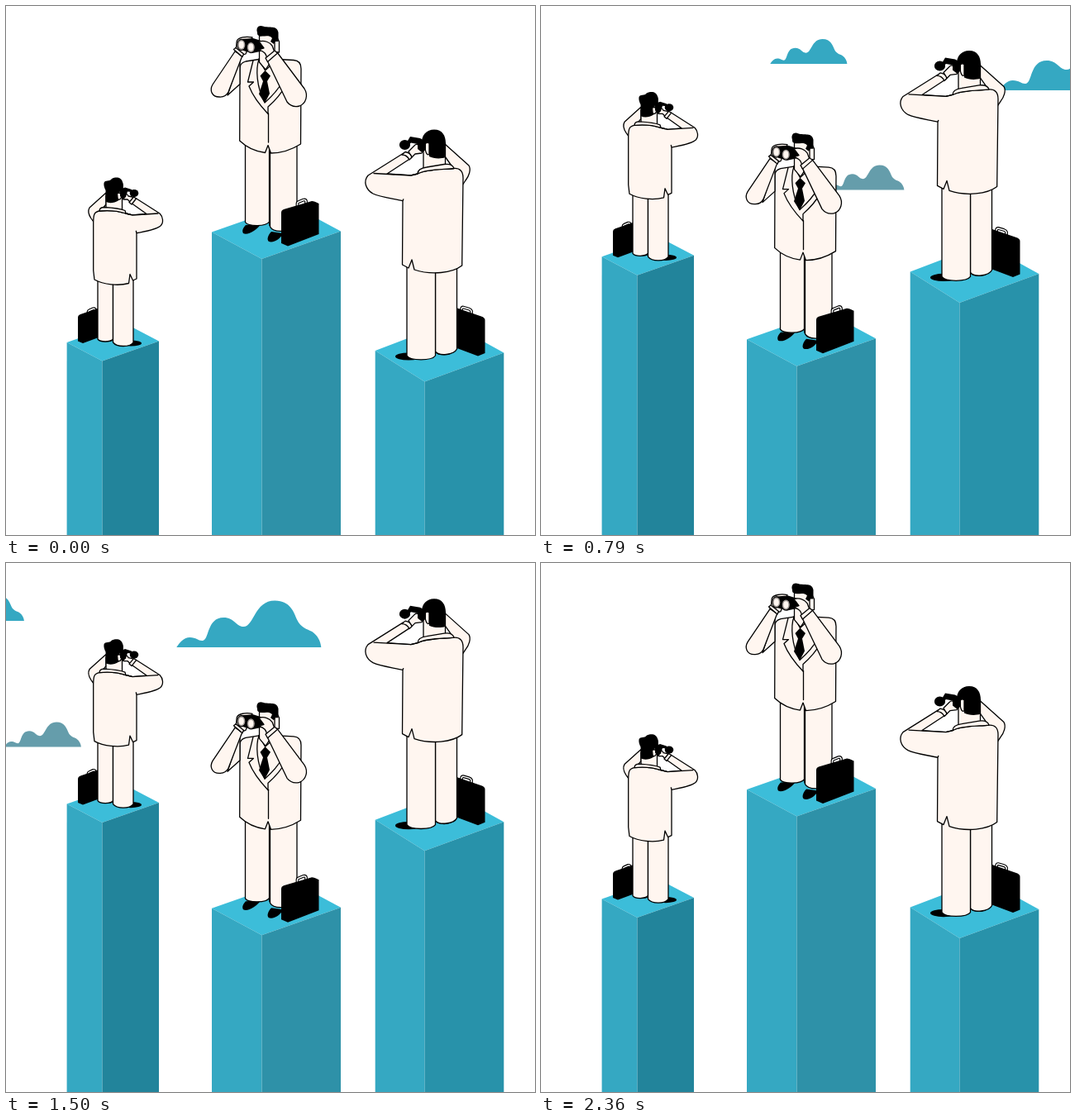
These frames come from a looping animation (640x640 px, 2.43 s). An HTML page with a canvas:

```html
<!DOCTYPE html>
<html lang="en">
<head>
<meta charset="utf-8">
<title>Lookouts</title>
<style>
html, body { margin: 0; width: 100%; height: 100%; overflow: hidden; background: #fff; }
canvas { display: block; width: 640px; height: 640px; }
</style>
</head>
<body>
<canvas id="stage" width="640" height="640"></canvas>
<script>
const ctx = document.getElementById('stage').getContext('2d');
const LOOP = 2430, STEPS = 34, TICKS = 60;
const CREAM = '#fff6f0', BLUE = '#35a8c2', TOP = '#3cbdd9', GREY = '#659dab', RING = '#a39d9a';

const layer = (d, fill, width, stroke = '#000') => ({ path: new Path2D(d), fill, width, stroke });
const skin = d => layer(d, CREAM, 1.3);
const ink = d => layer(d, '#000', 0);
const line = (d, w = 1.3) => layer(d, null, w);
const handle = d => [layer(d, null, 3.8), layer(d, null, 1.5, '#fff')];
const oval = (x, y, rx, ry, fill, width = 0) =>
  layer(`M${x - rx} ${y}a${rx} ${ry} 0 1 0 ${2 * rx} 0a${rx} ${ry} 0 1 0 ${-2 * rx} 0Z`, fill, width);
const lens = (x, y) => [oval(x, y, 5.6, 7.2, '#000'), oval(x, y, 4.5, 6, RING), oval(x, y, 3, 4.4, CREAM)];

// Front-facing man
const front = [
  ink('M290 265C287 268 285 272 287 275C292 278 304 271 308 264Z'),
  ink('M321 273C317 277 315 283 318 285C324 287 333 281 335 275Z'),
  skin('M289.5 160V261.5C293 267 315 267 318.5 261V160Z'),
  skin('M319.5 160V267C322 272 330 273 338 272L352 266V160Z'),
  line('M319 170V265', 2),
  ...handle('M352.500 244V239Q352.500 237.500 354 237L360 234.500Q362.500 234 363 236V241'),
  ink('M333 250Q333 247 336 246L370 236Q373 236 378.500 239V276L341 290.500L333 287Z'),
  skin('M283 75Q283 69 290 67L306 64.500H330L348 65.500Q357 66 357 76L356.500 167C347 173 336 178 320.500 178L317 168.500L313.500 177.500C302 176 291 171 282.700 163Z'),
  skin('M306 64.500C302 76 303 98 313 117C322 109 330 100 334 92L327 65Z'),
  line('M299 66L292.500 92H299.500L294 97C299 110 308 121 317 130.500V122C326 114 333 106 337 98'),
  line('M317.500 130V165'),
  skin('M306 64L313.500 78L329 64Z'),
  ink('M313.500 78L320 84.500L316 91L319 106L313 117.500L306 106.500L311 91L307.500 84.500Z'),
  skin('M284 60L268 108L283 94.500V64Z'),
  skin('M277 55L250 95C246 102 249 110 258 110C264 110.500 267 108 269 104L286 60Z'),
  skin('M306.500 36V68L314 77L320 68L325 56H330.500V43L325 32Z'),
  line('M325 44V56'),
  ink('M304 32C302 26 306 22.500 311 24.500C319 27 328 23 329.500 32V43H326L324 46L320 43L322 39C318 34 311 38 306 36C304 35 304 34 304 32Z'),
  skin('M277 54C280 50 278 46 279.500 42C281 38 290 36.500 298 38L290 58L284 60Z'),
  skin('M275.500 52.500L278 50.500L287.500 58L286 61.500Z'),
  ink('M284 40L299 39L312 43V54L298 57L287 54Z'),
  ...lens(284.800, 47),
  ...lens(296.300, 50),
  line('M290 41L298 42M300 45L310 46', .8),
  skin('M306 43C313 41 319 44 322 48L325 56L316 65C315 57 312 55 306 53L312 51Z'),
  skin('M316 66L328 56L361 100C366 108 363 118 355 121C349 122.500 344 121 340 116Z'),
  skin('M314 63L325 54L328.500 57L316.500 67.500Z')
];

// Man seen from behind, arms to the right
const backLeft = [
  ...handle('M99.500 375V370Q99.500 369 101 368.300L105.500 366.300Q107.500 366 108 368V371'),
  ink('M87 377Q87 374 90 373L112 365.500V401L93 408L87 405.500Z'),
  oval(124, 403, 7, 3, '#000'),
  oval(151, 408, 13, 3.6, '#000'),
  skin('M111 322V403C114 407 126 407 129.500 403V325Z'),
  skin('M129.500 325V407C134 413 150 413 154 407V322Z'),
  skin('M121 226L101 244C98 249 101 254 103 257L106.500 262L116 246L121 240Z'),
  skin('M121 230V249H140.500V227Z'),
  skin('M151 238L157 232.500L186 251C190 255 191 262 187 266C180 271 168 273 156 275L146 251L153 253L170 251.500Z'),
  skin('M105.700 262C105.700 252 107 249 113 248C124 247 136 248 145 251L153 253L158 275V330L153.500 332L150 324.500L148.500 335.500C136 339 118 337 107 331L105.700 320Z'),
  layer('M150 253L168 252.500L162 270L154 273Z', CREAM, 0),
  line('M145 251L153 253L184 251'),
  skin('M113 248C113 245 115 243.500 119 243.500C128 244 138 245 144 247.500L145 251C136 248 124 247 113 248Z'),
  ink('M118.500 214C120 210 125 213 128 209C134 206 140 208 141 213C143 217 141 220 142.500 223L138 224L136.500 230V235C131 238.500 125 239 121 237L120.500 223C119 220 118 217 118.500 214Z'),
  skin('M134.500 227C137 225 140 227 139.500 231C139 235 135 235 135 232Z'),
  skin('M141 230C144 226 147 227 148 230L153 231L155 234L151 238L147 234L142 234Z'),
  ink('M138 222L144 219.500L152 222V225L147 224.500L145 231L142 234L138 230Z'),
  oval(155, 226.500, 5.3, 4.6, '#000'),
  skin('M149 237.500L154.500 231L157.500 233L152 240Z')
];

// Man seen from behind, arms to the left
const backRight = [
  ...handle('M551 371V367Q551.300 364.500 553 364.500L560 366.500Q562.500 367.300 563 369V374'),
  ink('M543 364.500L575 375.500Q579.500 377 579.500 380V420L571 423.500L543 413Z'),
  oval(530, 419, 10, 3.5, '#000'),
  oval(487, 424, 16, 4.6, '#000'),
  skin('M519.500 300V418C524 424 542 422 545.500 415V300Z'),
  skin('M485 300V423C489 429.500 515 429.500 519.500 423V300Z'),
  skin('M531 167L560 193C563 198 560 206 556 211L552 217L541 196L531 182Z'),
  skin('M505 166V200H531.500V166Z'),
  skin('M481 178L438 205C432 212 435 222 444 227C452 231 468 233 481 236L500 203L490 205L461 203L490 184Z'),
  skin('M480 236L490 205L498 203C509 197 530 198 542 196.500C549 196 553 200 553 208L551.700 314C540 323 515 326 494 319L491 307L487 317L479.500 313Z'),
  layer('M470 204L490 205.500L500 205L484 234L468 231Z', CREAM, 0),
  line('M445 202.500L490 205L498 203'),
  skin('M498 203C498 198 502 196 509 195L530 191.500C538 190.500 541 193 542 196.500C530 198 509 197 498 203Z'),
  ink('M503 168C502 156 509 149.500 518 149.500C528 149.500 532 157 532 166V183C525 185.500 517 184.500 512 182V168Z'),
  skin('M512 166C508 164 506 167 507 172C508 180 511 181 512 179Z'),
  skin('M505 175C502 169 497 165 494 169L487 176L491 183L495 179L503 178Z'),
  ink('M486 163L489 158L501 160L508 164V174L503 177L498 173V167L490 165.500L487 168Z'),
  oval(482.500, 168, 6.6, 6, '#000'),
  skin('M479 180L483 176.500C487 177 490 180 491 183L488 186C486 182 483 180 479 180Z')
];

// l, f, r, b: corners of the top face; rise: vertical travel
const towers = [
  { l: [73.600, 407], f: [116.500, 429.500], r: [185, 405.500], b: [142, 383], side: '#22849b', rise: -140, man: backLeft },
  { l: [249, 273.500], f: [309.500, 306], r: [405, 272.500], b: [344.500, 240], side: '#2e91a8', rise: 175, man: front },
  { l: [446.700, 417], f: [506.500, 454.500], r: [602.300, 419.500], b: [536, 383], side: '#2892aa', rise: -129, man: backRight }
];

const puff = new Path2D('M0 0C4 -6 9 -12 16 -12C24 -12 26 -8 31 -8C40 -8 36 -36 57 -36C70 -36 72 -25 81 -25C94 -25 94 -56.500 119 -56.500C138 -56.500 142 -42 146 -33C150 -24 158 -22 164 -19C171 -14 174 -8 175 0Z');
const SPEED = 19.36;
const clouds = [
  { x: 664.500, y: 70, size: .532, color: BLUE },
  { x: 733.500, y: 222.500, size: .532, color: GREY },
  { x: 942, y: 102, size: 1, color: BLUE }
];

function poly(color, ...pts) {
  ctx.fillStyle = color;
  ctx.beginPath();
  pts.forEach(p => ctx.lineTo(p[0], p[1]));
  ctx.fill();
}

function drawCloud({ x, y, size, color }, tick) {
  ctx.save();
  ctx.translate(x - SPEED * tick, y);
  ctx.scale(size, size);
  ctx.fillStyle = color;
  ctx.fill(puff);
  ctx.restore();
}

function drawTower({ l, f, r, b, side, rise, man }, lift) {
  const floor = p => [p[0], 900];
  ctx.save();
  ctx.translate(0, rise * lift);
  poly(TOP, l, f, r, b);
  poly(BLUE, l, f, floor(f), floor(l));
  poly(side, f, r, floor(r), floor(f));
  for (const { path, fill, width, stroke } of man) {
    if (fill) {
      ctx.fillStyle = fill;
      ctx.fill(path);
    }
    if (width) {
      ctx.lineWidth = width;
      ctx.strokeStyle = stroke;
      ctx.stroke(path);
    }
  }
  ctx.restore();
}

function draw(ms) {
  const step = Math.floor((ms % LOOP + 8) * STEPS / LOOP) % STEPS;
  const tick = Math.ceil(step * 1.7651);
  const u = 1 - Math.abs(1 - tick / (TICKS / 2));
  const lift = u * u * (3 - 2 * u);
  ctx.fillStyle = '#fff';
  ctx.fillRect(0, 0, 640, 640);
  clouds.forEach(c => drawCloud(c, tick));
  towers.forEach(t => drawTower(t, lift));
}

ctx.lineJoin = ctx.lineCap = 'round';
let start;
function loop(now) {
  start ??= now;
  draw(Math.max(0, now - start));
  requestAnimationFrame(loop);
}
draw(0);
requestAnimationFrame(loop);
</script>
</body>
</html>
```
